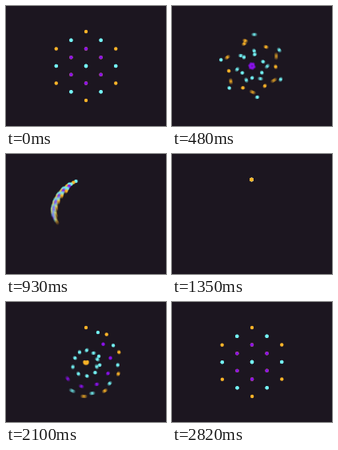
Animation of 200x150 px, one loop 2850 ms. Source, as an HTML page with a canvas:

```html
<!DOCTYPE html>
<html>
<head>
<meta charset="utf-8">
<style>
  html, body { margin: 0; height: 100%; overflow: hidden; background: #1c1620; }
  canvas { display: block; }
</style>
</head>
<body>
<canvas id="stage" width="200" height="150"></canvas>
<script>
const LOOP = 2850, STEP = 30, SHUTTER = 20, SAMPLES = 8;
const RADIUS = 21.5, DOT = 2.2;
const ORANGE = '#fbb429', CYAN = '#74f2f4', PURPLE = '#8912e8';
const COLORS = [ORANGE, CYAN, PURPLE, CYAN, ORANGE, CYAN];

const ctx = document.getElementById('stage').getContext('2d');
const layer = document.createElement('canvas');
layer.width = 200;
layer.height = 150;
const pen = layer.getContext('2d');

// S-curve from 0 to 1 with separate powers for its start and its end
function ease(t, start, end, a, b, k) {
  const x = Math.min(1, Math.max(0, (t - start) / (end - start)));
  const rise = Math.exp(k) * x ** a;
  return rise / (rise + (1 - x) ** b);
}

// Angles of the hexagon centres (outer) and of the dots around them (inner)
function angles(t) {
  const closing = t < 1480;
  const outer = closing ? ease(t, 0, 1425, 4.06, 1.8, 1.18) : ease(t, 1530, LOOP, 1.7, 1.55, 1.006);
  const inner = closing ? ease(t, 0, 1425, 2.65, 1.8, 0.905) : ease(t, 1530, LOOP, 1.49, 1.926, 1.17);
  const turn = (i, p) => (closing ? i + (6 - i) * p : i * p) * Math.PI / 3;
  return { outer: j => turn(j, outer), inner: k => turn(k, inner) };
}

function drawDots(t) {
  const { outer, inner } = angles(t);
  pen.fillStyle = '#1c1620';
  pen.fillRect(0, 0, 200, 150);
  for (let k = 5; k >= 0; k--) {
    pen.fillStyle = COLORS[k];
    for (let j = 0; j < 6; j++) {
      const a = outer(j), b = a + inner(k);
      pen.beginPath();
      pen.arc(100 + RADIUS * (Math.sin(a) + Math.sin(b)),
              75 - RADIUS * (Math.cos(a) + Math.cos(b)), DOT, 0, 2 * Math.PI);
      pen.fill();
    }
  }
}

// Motion blur: running average of several moments
function frame() {
  const t = Math.floor(performance.now() % LOOP / STEP) * STEP;
  for (let i = 0; i < SAMPLES; i++) {
    const shift = ((i + 0.5) / SAMPLES - 0.5) * SHUTTER;
    drawDots((t + shift + LOOP) % LOOP);
    ctx.globalAlpha = 1 / (i + 1);
    ctx.drawImage(layer, 0, 0);
  }
  requestAnimationFrame(frame);
}
frame();
</script>
</body>
</html>
```
